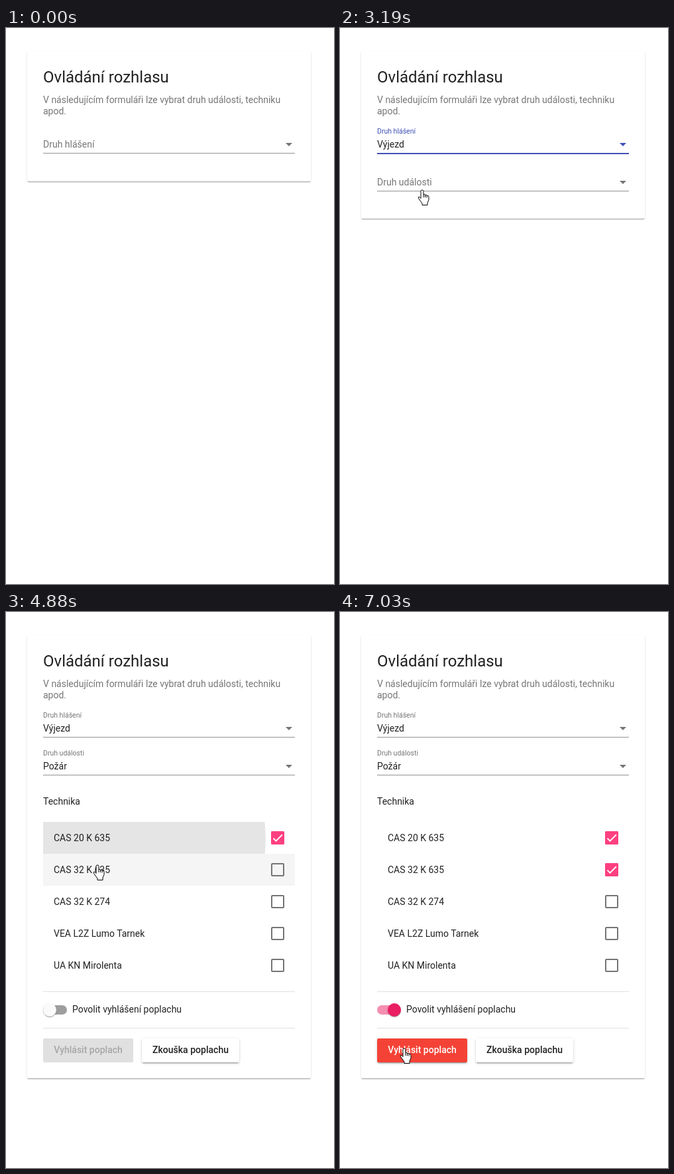
Animation, 495 px wide and 837 px high, one loop 7890 ms. Source, as an HTML page:

```html
<!DOCTYPE html>
<html lang="cs">
<head>
<meta charset="utf-8">
<style>
  html, body { margin: 0; width: 100%; height: 100%; overflow: hidden; background: #fff; }
  body { position: relative; font: 14px/20px Roboto, sans-serif; color: rgba(0,0,0,.87); }
  div, svg { position: absolute; box-sizing: border-box; }
  .text { white-space: nowrap; height: 20px; }
  .muted { color: rgba(0,0,0,.54); }
  .card { left: 32px; top: 35px; width: 428px; background: #fff; border-radius: 2px;
    box-shadow: 0 2px 1px -1px rgba(0,0,0,.2), 0 1px 1px rgba(0,0,0,.14), 0 1px 3px rgba(0,0,0,.12); }
  .title { font-size: 24px; }
  .rule { left: 56px; width: 380px; height: 1px; background: #e0e0e0; }
  .underline { background: rgba(0,0,0,.42); }
  .bar { left: 56px; width: 380px; height: 2px; background: #3f51b5; }
  .label { transform-origin: 0 50%; }
  .arrow { left: 422px; border: 5px solid transparent; border-bottom: 0; border-top-color: currentColor; }
  .panel { left: 40px; background: #fff; border-radius: 2px; overflow: hidden; transform-origin: 0 21px;
    box-shadow: 0 5px 5px -3px rgba(0,0,0,.2), 0 8px 10px 1px rgba(0,0,0,.14), 0 3px 14px 2px rgba(0,0,0,.12); }
  .option { left: 0; width: 100%; height: 42px; padding-left: 16px; line-height: 42px; overflow: hidden; }
  .row { left: 56px; width: 380px; height: 48px; padding-left: 16px; line-height: 48px; overflow: hidden; }
  .box { left: 344px; top: 14px; width: 20px; height: 20px; border: 2px solid #757575; border-radius: 2px; }
  .check { left: 344px; top: 14px; border-radius: 2px; background: #ff4081; }
  .track { left: 56px; top: 592px; width: 36px; height: 14px; border-radius: 8px; }
  .thumb { left: 56px; top: 589px; width: 20px; height: 20px; border-radius: 50%;
    box-shadow: 0 2px 1px -1px rgba(0,0,0,.2), 0 1px 1px rgba(0,0,0,.14), 0 1px 3px rgba(0,0,0,.12); }
  .button { top: 642px; height: 36px; border-radius: 2px; line-height: 35px; font-weight: 500;
    text-align: center; white-space: nowrap; overflow: hidden; }
  .ripple { border-radius: 50%; }
  .cursor { overflow: visible; fill: #fff; stroke: #000; stroke-linejoin: round; }
</style>
</head>
<body>
<script>
const LOOP = 7890;
const CHOOSE_KIND = 2313, CHOOSE_EVENT = 3890;
const CHECKED = [4740, 5090], TOGGLED = 5805;

const clamp = v => Math.min(1, Math.max(0, v));
const show = (el, on) => { el.style.display = on ? '' : 'none'; };

function bezier(x1, y1, x2, y2) {
  const at = (u, a, b) => 3 * (1 - u) ** 2 * u * a + 3 * (1 - u) * u * u * b + u ** 3;
  return x => {
    if (x <= 0) return 0;
    if (x >= 1) return 1;
    let lo = 0, hi = 1;
    for (let i = 0; i < 24; i++) {
      const mid = (lo + hi) / 2;
      if (at(mid, x1, x2) < x) lo = mid; else hi = mid;
    }
    return at(lo, y1, y2);
  };
}
const swift = bezier(.25, .8, .25, 1);
const decelerate = bezier(0, 0, .2, 1);
const mix = (a, b, p) => `rgb(${a.map((v, i) => v + (b[i] - v) * p)})`;
const raised = a => `0 3px 1px -2px rgba(0,0,0,${.2 * a}), 0 2px 2px rgba(0,0,0,${.14 * a}), 0 1px 5px rgba(0,0,0,${.12 * a})`;

function add(parent, className, style = {}, text = '') {
  const el = document.createElement('div');
  el.className = className;
  el.textContent = text;
  for (const key in style) el.style[key] = typeof style[key] === 'number' ? style[key] + 'px' : style[key];
  parent.append(el);
  return el;
}
const addText = (parent, x, centre, text, className = '') =>
  add(parent, 'text ' + className, { left: x, top: centre - 10 }, text);

function addSvg(parent, className, width, height, viewBox, body) {
  parent.insertAdjacentHTML('beforeend',
    `<svg class="${className}" width="${width}" height="${height}" viewBox="${viewBox}">${body}</svg>`);
  return parent.lastElementChild;
}

function addRipple(parent, x, y, radius, colour, down, enter = 450, fade = 200) {
  const el = add(parent, 'ripple', {
    left: x - radius, top: y - radius, width: 2 * radius, height: 2 * radius, background: colour });
  return t => {
    show(el, t >= down && t < down + enter + fade);
    el.style.transform = `scale(${decelerate((t - down) / enter)})`;
    el.style.opacity = 1 - clamp((t - down - enter) / fade);
  };
}

// A select field whose text is centred on y, with its drop-down panel.
function addSelect(parent, y, name, options, click, time) {
  add(parent, 'rule underline', { top: y + 13 });
  const bar = add(parent, 'bar', { top: y + 13 });
  const label = addText(parent, 56, y, name, 'label');
  const value = addText(parent, 56, y, options[0]);
  const arrow = add(parent, 'arrow', { top: y - 2 });
  const panel = add(document.body, 'panel', { top: y - 21, height: 42 * options.length });
  const items = options.map((text, i) => add(panel, 'option', { top: 42 * i }, text));
  const ripple = addRipple(items[0], click.x - 40, click.y - y + 21, click.radius, 'rgba(0,0,0,.1)', time.down);
  return t => {
    const focused = t >= time.focus && t < time.blur;
    const chosen = t >= time.choose;
    const floated = swift((t - time.open) / 400);
    const opened = swift((t - time.open) / 150);
    show(bar, focused);
    bar.style.transform = `scaleX(${.5 + .5 * swift((t - time.focus) / 300)})`;
    bar.style.opacity = clamp((t - time.focus) / 100);
    label.style.transform = `translateY(${-20 * floated}px) scale(${1 - .25 * floated})`;
    label.style.color = arrow.style.color = focused ? '#3f51b5' : 'rgba(0,0,0,.54)';
    show(value, chosen);
    show(panel, t >= time.open && t < time.choose + 350);
    panel.style.width = 380 + 32 * opened + 'px';
    panel.style.transform = `scaleY(${opened})`;
    panel.style.opacity = chosen ? 1 - clamp((t - time.choose - 100) / 250) : opened;
    items[0].style.background = `rgba(0,0,0,${chosen ? .12 : .04})`;
    items[0].style.color = chosen ? '#3f51b5' : '';
    ripple(t);
  };
}

const body = document.body;
const card = add(body, 'card');
addText(body, 56, 74, 'Ovládání rozhlasu', 'title');
addText(body, 56, 108, 'V následujícím formuláři lze vybrat druh události, techniku', 'muted');
addText(body, 56, 125, 'apod.', 'muted');
const eventPart = add(body, ''), alarmPart = add(body, '');

const kindSelect = addSelect(body, 175, 'Druh hlášení', ['Výjezd', 'Záloha', 'Hlášení'],
  { x: 151, y: 181, radius: 301 },
  { focus: 1385, open: 1465, down: 2220, choose: CHOOSE_KIND, blur: 3250 });
const eventSelect = addSelect(eventPart, 232, 'Druh události',
  ['Požár', 'Dopravní nehoda', 'Technická pomoc', 'Ostatní'],
  { x: 124, y: 244, radius: 330 },
  { focus: 3250, open: 3330, down: 3813, choose: CHOOSE_EVENT, blur: 4650 });

addText(alarmPart, 56, 285, 'Technika');
const rows = ['CAS 20 K 635', 'CAS 32 K 635', 'CAS 32 K 274', 'VEA L2Z Lumo Tarnek', 'UA KN Mirolenta']
  .map((text, i) => {
    const el = add(alarmPart, 'row', { top: 316 + 48 * i }, text);
    const ripple = i < 2 ? addRipple(el, 82, 26, 299, 'rgba(0,0,0,.1)', CHECKED[i] - 90) : null;
    add(el, 'box');
    const check = addSvg(el, 'check', 20, 20, '0 0 24 24',
      '<path d="M4.1 12.7 9 17.6 20.3 6.3" fill="none" stroke="#fff" stroke-width="2.2"/>');
    return (t, pointer) => {
      const hovered = Math.floor((pointer.y - 316) / 48) === i;
      el.style.background = hovered ? 'rgba(0,0,0,.04)' : '';
      check.style.opacity = i < 2 ? clamp((t - CHECKED[i]) / 90) : 0;
      if (ripple) ripple(t);
    };
  });

add(alarmPart, 'rule', { top: 571 });
const track = add(alarmPart, 'track');
const thumb = add(alarmPart, 'thumb');
const toggleRipple = addRipple(thumb, 10, 10, 23, 'rgba(233,30,99,.12)', 5740, 150, 450);
addText(alarmPart, 100, 598, 'Povolit vyhlášení poplachu');
add(alarmPart, 'rule', { top: 626 });
const alarmButton = add(alarmPart, 'button', { left: 56, width: 136 }, 'Vyhlásit poplach');
const buttonRipple = addRipple(alarmButton, 41, 15, 98, 'rgba(255,255,255,.1)', 6300);
add(alarmPart, 'button', { left: 205, width: 147, background: '#fff', boxShadow: raised(1) }, 'Zkouška poplachu');

function drawToggle(t) {
  const p = swift((t - TOGGLED) / 400);
  const on = t >= TOGGLED;
  thumb.style.transform = `translateX(${16 * clamp((t - TOGGLED) / 70)}px)`;
  thumb.style.background = mix([250, 250, 250], [233, 30, 99], p);
  track.style.background = mix([158, 158, 158], [244, 143, 177], p);
  alarmButton.style.background = mix([224, 224, 224], [244, 67, 54], p);
  alarmButton.style.color = on ? '#fff' : 'rgba(0,0,0,.26)';
  alarmButton.style.boxShadow = raised(p);
  toggleRipple(t);
  buttonRipple(t);
}

const arrowCursor = addSvg(body, 'cursor', 13, 20, '0 0 13 20',
  '<path d="M.5.5V16.5L4.2 12.9 6.7 18.5 9 17.5 6.6 12.1H11.6Z"/>');
const handCursor = addSvg(body, 'cursor', 18, 24, '6.5 .5 18 24',
  `<path d="M6.5.5Q8.5.5 8.5 2V7Q11 6 11 8Q13.5 7 13.5 9Q16.5 8 16.5 11V15L14.5 19.5V23H6.5V20.5L2 14.5
   Q0 11.5 1 10.8Q2.5 10 4.5 13V2Q4.5.5 6.5.5Z"/><path d="M8.5 7V11.5M11 8V11.5M13.5 9V12" fill="none"/>`);

const moves = [
  { from: 500, to: 1120, x: 151, y: 181 },
  { from: 2680, to: 3100, x: 124, y: 244 },
  { from: 4050, to: 4560, x: 138, y: 343 },
  { from: 4780, to: 4960, x: 138, y: 390 },
  { from: 5150, to: 5570, x: 82, y: 600 },
  { from: 5810, to: 6250, x: 97, y: 657 },
];
function pointerAt(t) {
  let x = 398, y = 815;
  for (const move of moves) {
    const p = 1 - (1 - clamp((t - move.from) / (move.to - move.from))) ** 2;
    x += (move.x - x) * p;
    y += (move.y - y) * p;
  }
  return { x, y };
}
function isClickable(t, y) {
  const within = (top, bottom) => y >= top && y <= bottom;
  if (within(154, 190)) return true;
  if (t < CHOOSE_EVENT) return t >= CHOOSE_KIND && within(208, 248);
  return within(316, 556) || within(587, 611) || within(642, 678);
}
function drawPointer(t, { x, y }) {
  const hand = isClickable(t, y);
  show(handCursor, t >= 500 && hand);
  show(arrowCursor, t >= 500 && !hand);
  for (const el of [handCursor, arrowCursor]) {
    el.style.left = Math.round(x) + 'px';
    el.style.top = Math.round(y) + 'px';
  }
}

function draw(t) {
  const pointer = pointerAt(t);
  card.style.height = (t < CHOOSE_KIND ? 196 : t < CHOOSE_EVENT ? 252 : 667) + 'px';
  show(eventPart, t >= CHOOSE_KIND);
  show(alarmPart, t >= CHOOSE_EVENT);
  kindSelect(t);
  eventSelect(t);
  for (const row of rows) row(t, pointer);
  drawToggle(t);
  drawPointer(t, pointer);
}

const start = performance.now();
function tick() {
  draw((performance.now() - start) % LOOP);
  requestAnimationFrame(tick);
}
tick();
</script>
</body>
</html>
```
